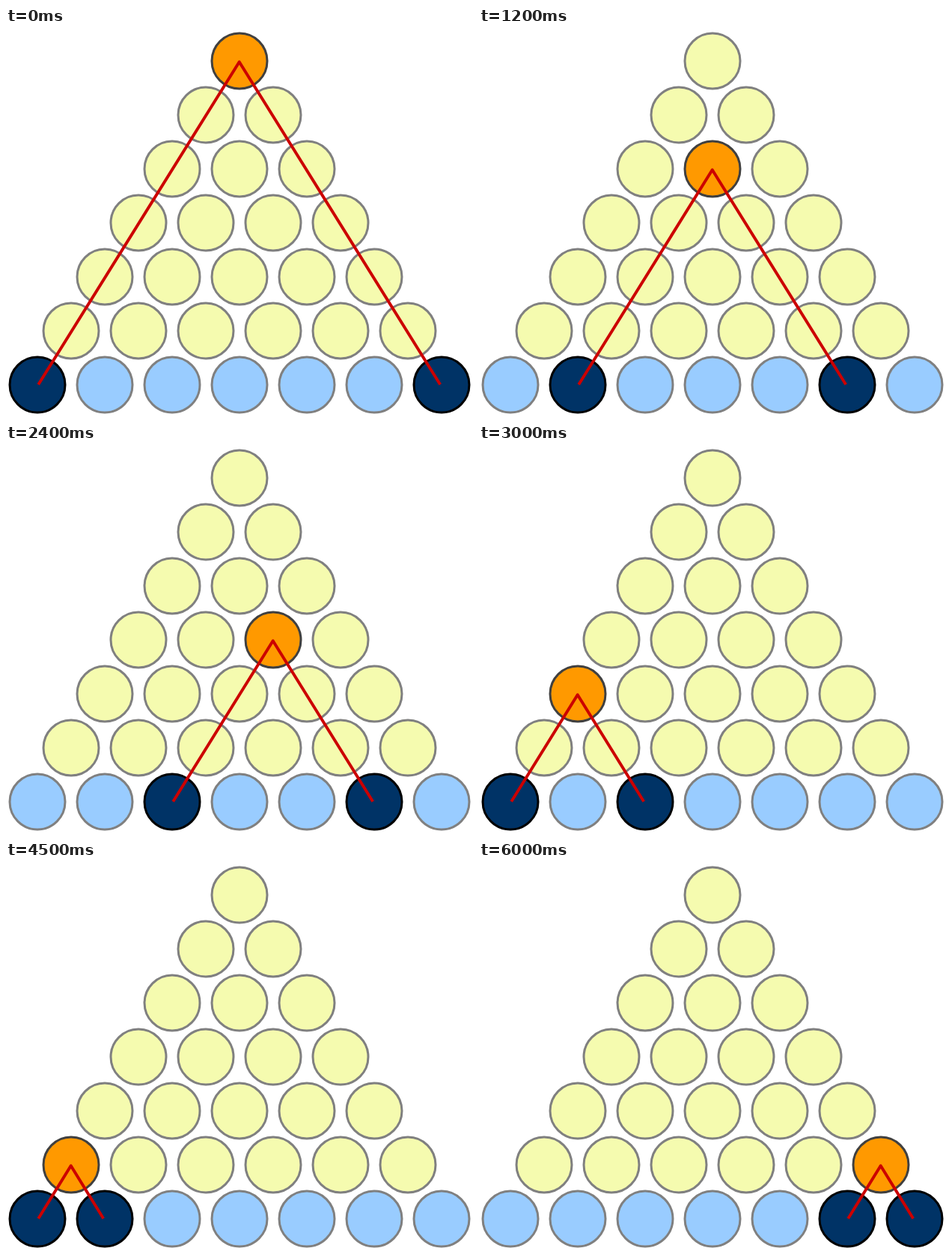
An HTML page for the animation above (6.3 s loop, 624 px wide and 519 px high).

```html
<!DOCTYPE html>
<html lang="en">
<head>
<meta charset="utf-8">
<title>Triangle of circles</title>
<style>
  html, body { margin: 0; width: 100%; height: 100%; overflow: hidden; background: #fff; }
  svg { display: block; }
  circle { stroke-width: 3; }
  .cell { fill: #f5fbaf; stroke: #808080; }
  .base { fill: #9cf; stroke: #808080; }
  .apex { fill: #f90; stroke: #404040; }
  .end { fill: #036; stroke: #000; }
  path { fill: none; stroke: #c00; stroke-width: 4; stroke-linejoin: round; }
</style>
</head>
<body>
<svg width="624" height="519" viewBox="0 0 624 519"></svg>
<script>
const STEP = 300, ROWS = 7, LAST = ROWS - 1;
const svg = document.querySelector('svg');

function add(tag, attrs) {
  const el = document.createElementNS('http://www.w3.org/2000/svg', tag);
  for (const name in attrs) el.setAttribute(name, attrs[name]);
  return svg.appendChild(el);
}

const centre = (row, col) => ({ x: 312 - 45 * row + 90 * col, y: 44 + 72 * row });

const grid = [];
const steps = [];
for (let row = 0; row < ROWS; row++) {
  grid.push([]);
  for (let col = 0; col <= row; col++) {
    const { x, y } = centre(row, col);
    grid[row].push(add('circle', { cx: x, cy: y, r: 37 }));
    if (row < LAST) steps.push({ row, col });
  }
}
const link = add('path', {});

function show({ row, col }) {
  const right = col + LAST - row;
  grid.forEach((line, r) => line.forEach((dot, c) => {
    let kind = r === LAST ? 'base' : 'cell';
    if (r === row && c === col) kind = 'apex';
    if (r === LAST && (c === col || c === right)) kind = 'end';
    dot.setAttribute('class', kind);
  }));
  const top = centre(row, col), a = centre(LAST, col), b = centre(LAST, right);
  link.setAttribute('d',
    `M${a.x + 1.2} ${a.y - .3}L${top.x - .3} ${top.y + 1.3}L${b.x - 1.8} ${b.y - .3}`);
}

let current = -1;
const start = performance.now();
function tick() {
  const index = Math.floor((performance.now() - start) / STEP) % steps.length;
  if (index !== current) show(steps[current = index]);
  requestAnimationFrame(tick);
}
tick();
</script>
</body>
</html>
```
